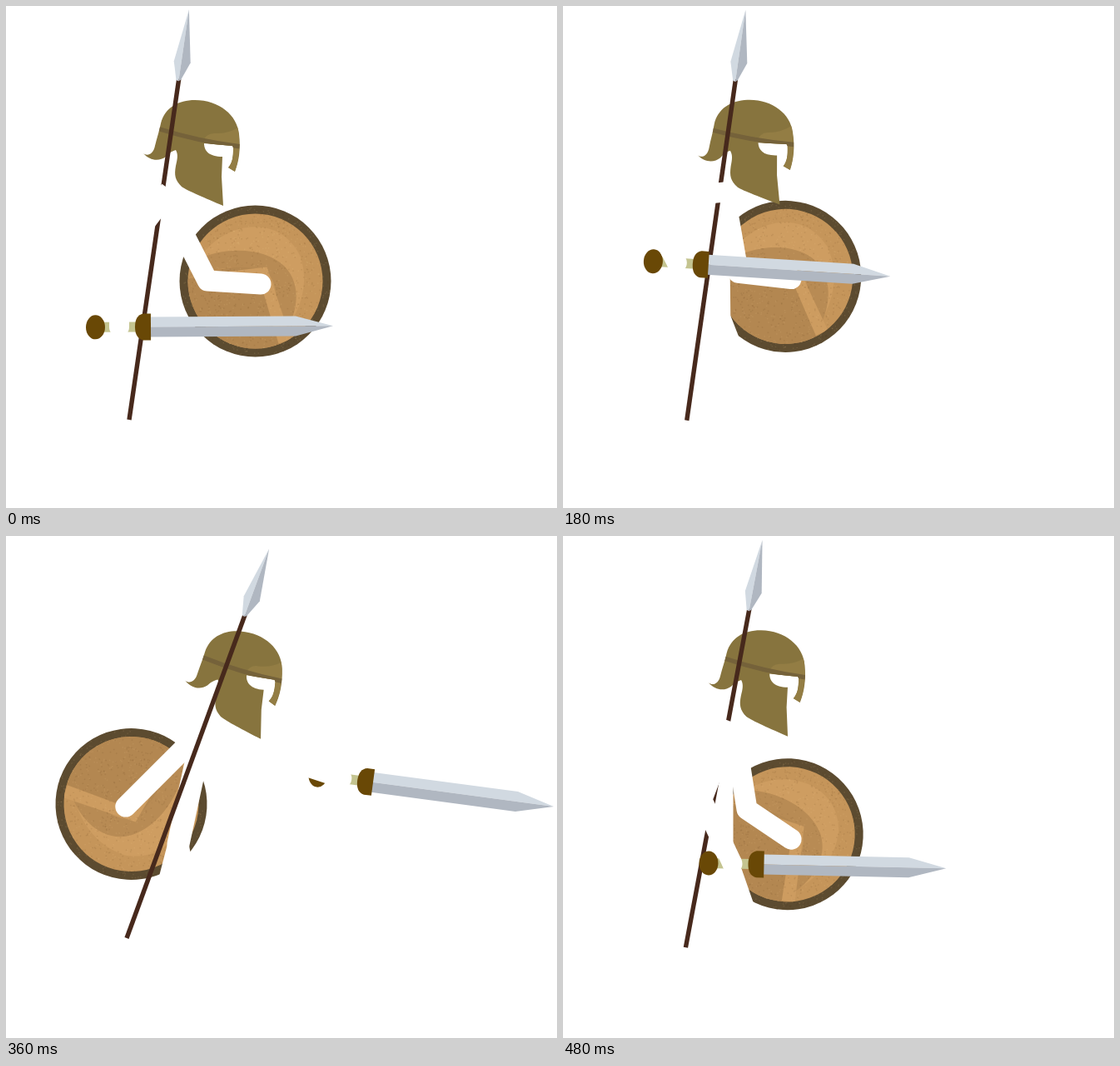
An HTML page with a canvas for the animation above (510 ms loop, 662x603 px).

```html
<!DOCTYPE html>
<html lang="en">
<head>
<meta charset="utf-8">
<title>Hoplite strike</title>
<style>
  html, body { margin: 0; width: 100%; height: 100%; overflow: hidden; background: #fff; }
  canvas { display: block; }
</style>
</head>
<body>
<canvas id="stage" width="662" height="603"></canvas>
<script>
const ctx = document.getElementById('stage').getContext('2d');
const LOOP = 510, STEP = 30, WOUND = 240, RELEASE = 360, RAD = Math.PI / 180;

// Props are [x, y, angle], joints are [x, y]
const ready = {
  shield: [299.5, 330.5, 0], spear: [148, 497, 8.3], helmet: [184, 148, 0], sword: [174, 385.5, -0.3],
  shieldShoulder: [213, 273], swordShoulder: [197, 221], chest: [188, 262], hip: [187, 370]
};
const windUp = {
  shield: [263.5, 323, -6], spear: [149, 498, 8.1], helmet: [178.5, 150, -3], sword: [188, 279.5, 11.9],
  shieldShoulder: [199, 255], swordShoulder: [197, 224], chest: [186, 258], hip: [188, 372]
};
const strike = {
  shield: [150.5, 322, 127], spear: [145, 483, 20.1], helmet: [236.5, 146, 4.5], sword: [441, 296, 7.6],
  shieldShoulder: [235, 234], swordShoulder: [225, 232], chest: [235, 240], hip: [207, 370]
};
// How far each part bows away from a straight path halfway
const raiseArc = { shield: [-7, 0, -3], sword: [-13, 6.5, -7], shieldShoulder: [-4, -3] };
const returnArc = { shield: [0, 46, 0], sword: [22, 42, 0], shieldShoulder: [-10, 0], chest: [-10, 0] };
const feet = [[183, 462], [223, 462]];

const helmetShell = new Path2D('M165 177C170 181 177 178 179 168C181 159 184 151 186 141C191 122 207 113 227 113C256 113 278 131 280 154C282 172 280 186 275 199L267 194C272 188 273 182 273 170L272 168L238 165C238 174 244 181 260 181L259 205L261 240C240 231 218 222 211 217C203 209 202 203 204 192C206 184 207 178 204 173C198 175 196 177 192 181C184 187 173 186 165 177Z');
const helmetFront = new Path2D('M236 164Q240 153 250 153Q266 154 279 146Q283 178 275 199L267 195Q273 187 273 170Z');
const helmetBand = new Path2D('M184 145Q232 160 281 166L280.5 171.5Q230 165 182.5 150Z');
const woodShade = new Path2D('M-82 -2Q-30 -22 12 -17L41 70L27 84L-82 84Z');
const woodLight = new Path2D('M-66 -28C-40 -70 28 -84 54 -30C64 0 58 30 34 62C44 26 40 -8 22 -23C-4 -42 -40 -38 -66 -28Z');
const woodArch = new Path2D('M-72 -24C-40 -42 10 -42 35 -18C58 6 50 42 33 66L24 30C27 6 20 -8 8 -14C-18 -20 -50 -16 -80 -4Z');
const strap = new Path2D('M-55 -9L14 -17L43 70L28 75L5 -2Z');
const guard = new Path2D('M0 -16H-9Q-19 -14 -19 0Q-19 14 -9 16H0Z');

let seed = 7;
const random = () => (seed = seed * 16807 % 2147483647) / 2147483647;
const grain = Array.from({ length: 1100 }, () => {
  const r = 90 * Math.sqrt(random()), a = random() * 2 * Math.PI;
  return [r * Math.cos(a), r * Math.sin(a), random() < 0.55];
});

function blend(from, to, u, arcs) {
  const pose = {};
  for (const part in from) {
    pose[part] = from[part].map((v, i) =>
      v + (to[part][i] - v) * u + 4 * u * (1 - u) * (arcs[part] ? arcs[part][i] : 0));
  }
  return pose;
}

function poseAt(t) {
  if (t <= WOUND) return blend(ready, windUp, t / WOUND, raiseArc);
  const u = Math.max(0, (t - RELEASE) / (LOOP - RELEASE));
  return blend(strike, ready, u, returnArc);
}

// Point (lx, ly) of a placed prop, in stage coordinates
function pointOn([x, y, angle], lx, ly) {
  const c = Math.cos(angle * RAD), s = Math.sin(angle * RAD);
  return [x + lx * c - ly * s, y + lx * s + ly * c];
}

// Elbow of a two-bone arm
function elbow([x, y], [hx, hy], upper, fore) {
  const dx = hx - x, dy = hy - y, d = Math.hypot(dx, dy);
  const along = (upper ** 2 - fore ** 2 + d * d) / (2 * d);
  const side = Math.sqrt(Math.max(0, upper ** 2 - along ** 2));
  return [x + (dx * along - dy * side) / d, y + (dy * along + dx * side) / d];
}

function fill(color, path) {
  ctx.fillStyle = color;
  ctx.fill(path);
}

function poly(color, ...p) {
  ctx.beginPath();
  for (let i = 0; i < p.length; i += 2) ctx.lineTo(p[i], p[i + 1]);
  ctx.fillStyle = color;
  ctx.fill();
}

function oval(color, x, y, rx, ry = rx) {
  ctx.beginPath();
  ctx.ellipse(x, y, rx, ry, 0, 0, 2 * Math.PI);
  ctx.fillStyle = color;
  ctx.fill();
}

function limb(width, cap, ...joints) {
  ctx.beginPath();
  for (const [x, y] of joints) ctx.lineTo(x, y);
  ctx.strokeStyle = '#fff';
  ctx.lineWidth = width;
  ctx.lineCap = cap;
  ctx.lineJoin = 'round';
  ctx.stroke();
}

function placed([x, y, angle], draw) {
  ctx.save();
  ctx.translate(x, y);
  ctx.rotate(angle * RAD);
  draw();
  ctx.restore();
}

function drawShield() {
  oval('#5c4b30', 0, 0, 91);
  oval('#c5955a', 0, 0, 81);
  ctx.save();
  ctx.clip();
  fill('#b38751', woodShade);
  fill('#ce9d61', woodLight);
  fill('#b88b54', woodArch);
  fill('#cd9c60', strap);
  ctx.restore();
  for (const [x, y, dark] of grain) {
    ctx.fillStyle = dark ? 'rgba(80,50,15,.1)' : 'rgba(255,220,160,.1)';
    ctx.fillRect(x, y, 1.5, 1.5);
  }
}

function drawHelmet() {
  ctx.translate(-184, -148);
  fill('#87743e', helmetShell);
  ctx.clip(helmetShell);
  fill('#937d44', helmetFront);
  fill('#75623a', helmetBand);
}

function drawSpear() {
  ctx.fillStyle = '#47291c';
  ctx.fillRect(-2.7, -414, 5.4, 414);
  poly('#d1d9e1', 0, -498, -9, -434, -3, -412, 0, -411);
  poly('#b0b7c1', 0, -498, 11, -435, 2.5, -413, 0, -411);
}

function drawSword() {
  ctx.fillStyle = '#c4c490';
  ctx.fillRect(-58, -6, 42, 12);
  oval('#694806', -66.5, 0, 11.5, 14.5);
  poly('#d1d9e1', -1, -12, 174, -12, 219, 0, -1, 0);
  poly('#b0b7c1', -1, 0, 219, 0, 174, 12, -1, 12);
  fill('#694806', guard);
}

function drawBody({ shield, chest, hip, shieldShoulder }) {
  const hand = pointOn(shield, 6.5, 3.5);
  limb(27, 'round', chest, hip);
  for (const foot of feet) limb(25, 'round', hip, foot);
  limb(25, 'round', shieldShoulder, elbow(shieldShoulder, hand, 64, 64), hand);
}

function drawSwordAndArm({ sword, swordShoulder }) {
  const hand = pointOn(sword, -38, 0);
  placed(sword, drawSword);
  limb(24, 'butt', swordShoulder, elbow(swordShoulder, hand, 100, 85), hand);
  oval('#fff', ...hand, 12);
}

function render(t) {
  const pose = poseAt(t);
  ctx.setTransform(1, 0, 0, 1, 0, 0);
  ctx.fillStyle = '#fff';
  ctx.fillRect(0, 0, 662, 603);
  // slow drift while the strike is held
  if (t > WOUND && t < RELEASE) ctx.translate((t - RELEASE) / 15, 0);

  placed(pose.shield, drawShield);
  drawBody(pose);
  // leaning forward brings the spear in front of the sword arm
  const spearInFront = pose.spear[2] > 12;
  if (spearInFront) drawSwordAndArm(pose);
  placed(pose.helmet, drawHelmet);
  placed(pose.spear, drawSpear);
  if (!spearInFront) drawSwordAndArm(pose);
}

function tick() {
  const t = performance.now() % LOOP;
  render(Math.floor(t / STEP) * STEP);
  requestAnimationFrame(tick);
}
tick();
</script>
</body>
</html>
```
